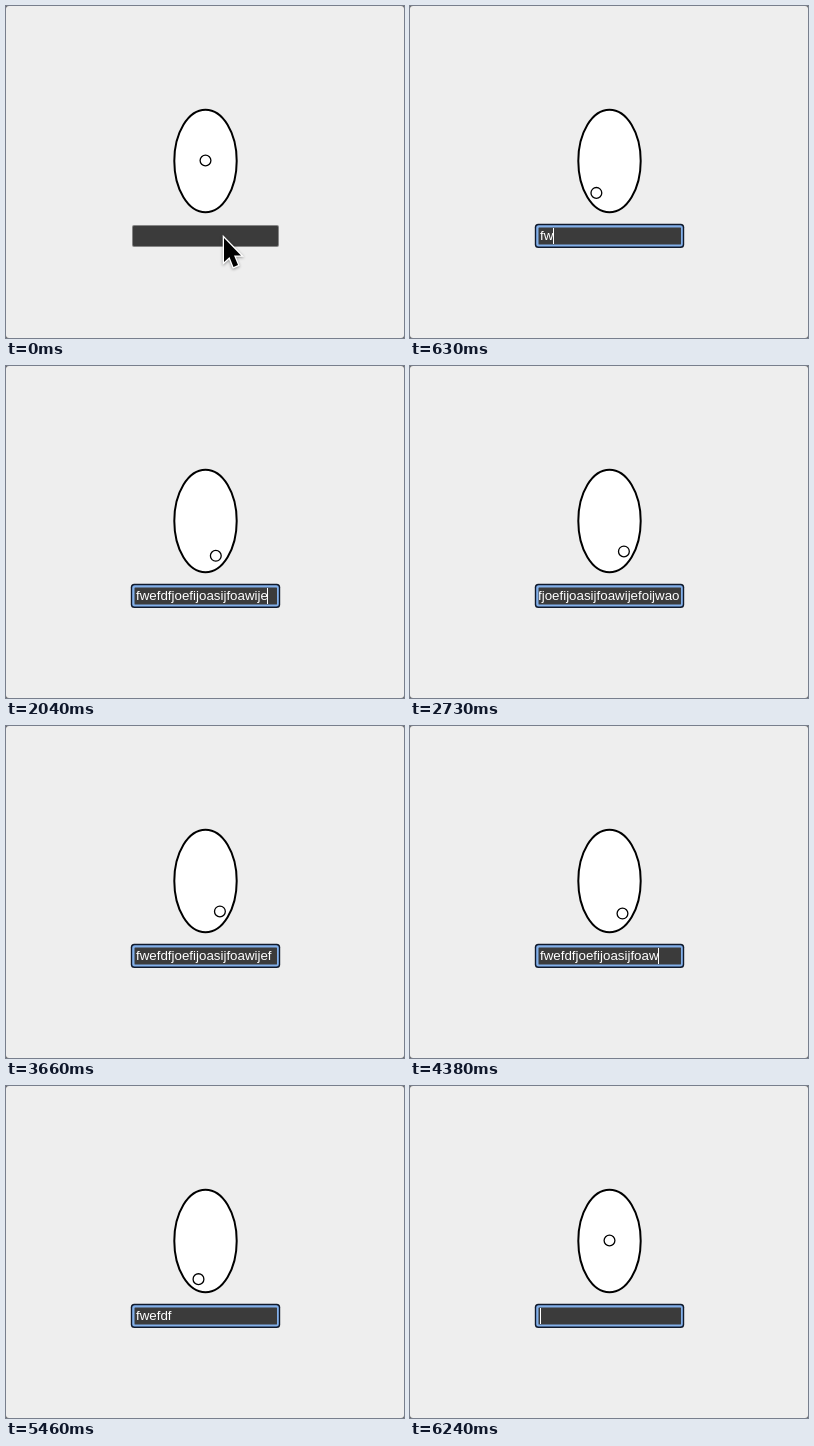
Animation of 398 by 332 pixels, one loop 6.3 s. Source, as an HTML page with a canvas:

```html
<!DOCTYPE html>
<html lang="en">
<head>
<meta charset="utf-8">
<title>Eye following a text caret</title>
<style>
  html, body { margin: 0; width: 100%; height: 100%; overflow: hidden; background: #666; }
  canvas { display: block; width: 398px; height: 332px; }
</style>
</head>
<body>
<canvas id="stage"></canvas>
<script>
const W = 398, H = 332, LOOP = 6300;
const canvas = document.getElementById('stage');
const ctx = canvas.getContext('2d');
const scale = window.devicePixelRatio || 1;
canvas.width = W * scale;
canvas.height = H * scale;

const FONT = '13.333px "Liberation Sans", Arial, sans-serif';
const TEXT = 'fwefdfjoefijoasijfoawijefoijwao';
const FIELD = { left: 130, right: 269.5, caretY: 230 };
const EYE = { x: 199.5, y: 154.5, reachX: 22, reachY: 41 };
const GLIDE = 240;

// Keystrokes as [time, text length]
const keys = [[330, 1], [480, 2], [640, 3], [800, 4], [985, 5], [1075, 6]];
function run(start, gap, from, to) {
  const dir = Math.sign(to - from);
  for (let i = 0; i <= Math.abs(to - from); i++) keys.push([start + i * gap, from + i * dir]);
}
run(1270, 44, 7, 24);
run(2050, 36, 25, 31);
run(3210, 48, 30, 25);
keys.push([3870, 24]);
run(4240, 70, 23, 0);

// Spans in which the caret is blinked off
const blinks = [[0, 60], [2730, 3060], [3660, 3870], [5440, 5500]];

// Pointer tip as [time, x, y]
const pointerPath = [[0, 217, 230], [60, 217, 230], [180, 227, 192], [330, 227, 192], [480, 282, 269]];

function bezier(a, b, s) {
  return 3 * (1 - s) * (1 - s) * s * a + 3 * (1 - s) * s * s * b + s * s * s;
}
function ease(p) {
  if (p >= 1) return 1;
  let lo = 0, hi = 1;
  for (let i = 0; i < 18; i++) {
    const mid = (lo + hi) / 2;
    if (bezier(0.25, 0.25, mid) < p) lo = mid; else hi = mid;
  }
  return bezier(0.1, 1, lo);
}

ctx.font = FONT;
const widths = Array.from({ length: TEXT.length + 1 }, (_, n) => ctx.measureText(TEXT.slice(0, n)).width);

function gazeFor(length) {
  if (!length) return { x: EYE.x, y: EYE.y };
  const caretX = Math.min(FIELD.left + widths[length], 265);
  const angle = Math.atan2(FIELD.caretY - EYE.y, caretX - EYE.x);
  return { x: EYE.x + EYE.reachX * Math.cos(angle), y: EYE.y + EYE.reachY * Math.sin(angle) };
}

function glideAt(g, t) {
  const p = ease((t - g.start) / GLIDE);
  return { x: g.from.x + (g.to.x - g.from.x) * p, y: g.from.y + (g.to.y - g.from.y) * p };
}

// Each new gaze starts from wherever the previous glide had got to
const glides = [{ start: -GLIDE, from: gazeFor(0), to: gazeFor(0) }];
for (const [time, length] of keys) {
  const last = glides[glides.length - 1], to = gazeFor(length);
  if (to.x !== last.to.x || to.y !== last.to.y) {
    glides.push({ start: time, from: glideAt(last, time), to });
  }
}

function box(x, y, w, h, r, color) {
  ctx.fillStyle = color;
  ctx.beginPath();
  ctx.roundRect(x, y, w, h, r);
  ctx.fill();
}

function oval(x, y, rx, ry, line) {
  ctx.beginPath();
  ctx.ellipse(x, y, rx, ry, 0, 0, Math.PI * 2);
  ctx.fillStyle = '#fff';
  ctx.fill();
  ctx.lineWidth = line;
  ctx.strokeStyle = '#000';
  ctx.stroke();
}

function drawField(t) {
  if (t < 60) {
    box(126, 219, 147, 22, 2, '#858585');
    box(127, 220, 145, 20, 1, '#3b3b3b');
    return;
  }
  box(124.8, 217.8, 149.4, 24.2, 3.5, '#101a2c');
  box(126.2, 219.2, 146.6, 21.4, 2.5, '#83b0ea');
  box(128.5, 221.5, 142.5, 17, 0.5, '#3b3b3b');

  let length = 0;
  for (const key of keys) if (key[0] <= t) length = key[1];
  const end = Math.min(FIELD.left + widths[length], FIELD.right);

  ctx.save();
  ctx.beginPath();
  ctx.rect(129, 221, 142, 18);
  ctx.clip();
  ctx.font = FONT;
  ctx.fillStyle = '#fff';
  ctx.fillText(TEXT.slice(0, length), end - widths[length], 234);
  if (!blinks.some(([from, to]) => t >= from && t < to)) {
    ctx.fillRect(Math.round(end - 0.5), 222, 1, 16);
  }
  ctx.restore();
}

function drawPointer(t) {
  const next = pointerPath.findIndex(step => step[0] > t);
  if (next < 0) return;
  const [t0, x0, y0] = pointerPath[next - 1], [t1, x1, y1] = pointerPath[next];
  const p = (t - t0) / (t1 - t0);
  ctx.save();
  ctx.translate(x0 + (x1 - x0) * p, y0 + (y1 - y0) * p);
  const arrow = new Path2D('M1 2 L1 26 L6.5 21 L10.5 31 L15 29 L11 19.5 L18 19.5 Z');
  ctx.shadowColor = 'rgba(0,0,0,.4)';
  ctx.shadowBlur = 3 * scale;
  ctx.shadowOffsetY = scale;
  ctx.lineWidth = 2.6;
  ctx.strokeStyle = '#fff';
  ctx.stroke(arrow);
  ctx.shadowColor = 'transparent';
  ctx.fillStyle = '#000';
  ctx.fill(arrow);
  ctx.restore();
}

function draw(t) {
  ctx.setTransform(scale, 0, 0, scale, 0, 0);
  ctx.fillStyle = '#666';
  ctx.fillRect(0, 0, W, H);
  box(0, 0, W, H, 3, '#eee');
  oval(199.5, 155, 31.2, 51.2, 2);
  let glide = glides[0];
  for (const g of glides) if (g.start <= t) glide = g;
  const pupil = glideAt(glide, t);
  oval(pupil.x, pupil.y, 5.4, 5.4, 1.3);
  drawField(t);
  drawPointer(t);
}

const began = performance.now();
function tick() {
  draw((performance.now() - began) % LOOP);
  requestAnimationFrame(tick);
}
tick();
</script>
</body>
</html>
```
